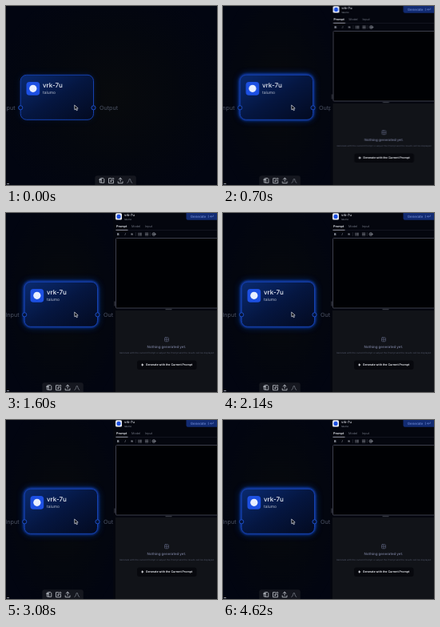
An HTML page that plays this animation: 264 by 224 pixels, repeating every 4.64 s.

```html
<!DOCTYPE html>
<html lang="en">
<head>
<meta charset="utf-8">
<title>Model node panel</title>
<style>
  html, body { margin: 0; width: 100%; height: 100%; overflow: hidden; background: #020510; }
  svg { display: block; width: 264px; height: 224px; font-family: Inter, sans-serif; text-rendering: geometricPrecision; }
  .slide { animation: slide 4640ms infinite; }
  .edge { --from: 131px; }
  .middle { --from: -41px; } /* relative to the panel edge */
  .end { --from: 49px; }
  .tools { --from: 66px; }
  @keyframes slide {
    0%, .86% { transform: translateX(var(--from)); animation-timing-function: cubic-bezier(.22, 1, .36, 1); }
    20%, 100% { transform: translateX(0); }
  }
  .pane { animation: squeeze 4640ms infinite; }
  @keyframes squeeze {
    0%, .86% { transform: scaleX(1); animation-timing-function: cubic-bezier(.22, 1, .36, 1); }
    20%, 100% { transform: scaleX(.53); }
  }
  .node { animation: recenter 4640ms infinite; }
  @keyframes recenter {
    0%, 8.6% { transform: translateX(0); animation-timing-function: ease-in-out; }
    20%, 100% { transform: translateX(5px); }
  }
  .glow { animation: glow 4640ms infinite; }
  @keyframes glow {
    0%, .86% { opacity: .15; animation-timing-function: ease-out; }
    7%, 100% { opacity: 1; }
  }
  .pulse { animation: pulse 2320ms ease-in-out infinite; }
  @keyframes pulse { 0%, 100% { opacity: 1; } 50% { opacity: .9; } }

  /* The hint takes two lines until the panel is wide enough. */
  .above, .below { animation: rewrap 4640ms step-end infinite; }
  .above { --gap: -2.6px; }
  .below { --gap: 1.9px; }
  @keyframes rewrap { 0% { transform: translateY(var(--gap)); } 14% { transform: none; } }
  .two { animation: narrow 4640ms step-end infinite; }
  .one { animation: narrow 4640ms step-end infinite reverse; animation: full 4640ms step-end infinite; }
  @keyframes narrow { 0% { opacity: 1; } 14%, 100% { opacity: 0; } }
  @keyframes full { 0% { opacity: 0; } 14%, 100% { opacity: 1; } }

  .icon { fill: none; stroke: #c6c9d1; stroke-width: .8; stroke-linecap: round; stroke-linejoin: round; }
  .fine { stroke: #a5a9b4; stroke-width: .55; }
  .mid { text-anchor: middle; }
</style>
</head>
<body>
<svg viewBox="0 0 264 224">
  <defs>
    <radialGradient id="sky">
      <stop offset="0" stop-color="#080a0d"/>
      <stop offset=".55" stop-color="#04070e"/>
      <stop offset="1" stop-color="#020511"/>
    </radialGradient>
    <linearGradient id="card" x1="0" y1="0" x2="1" y2="1">
      <stop offset="0" stop-color="#0a2a70"/>
      <stop offset=".5" stop-color="#051640"/>
      <stop offset="1" stop-color="#030a20"/>
    </linearGradient>
    <filter id="wide" x="-30%" y="-40%" width="160%" height="180%"><feGaussianBlur stdDeviation="5"/></filter>
    <filter id="near" x="-20%" y="-30%" width="140%" height="160%"><feGaussianBlur stdDeviation="1.7"/></filter>
    <clipPath id="panel"><rect x="134" width="190" height="224"/></clipPath>
  </defs>

  <rect width="264" height="224" fill="#020511"/>
  <g class="pane"><ellipse cx="134" cy="112" rx="150" ry="140" fill="url(#sky)"/></g>
  <path d="M1 222.5h3" stroke="#b9bcc4" stroke-width=".8"/>

  <g class="node">
    <g class="glow"><g class="pulse">
      <rect x="17" y="85" width="93.500" height="58" rx="9" fill="#0a3095" opacity=".75" filter="url(#wide)"/>
      <rect x="18" y="86" width="91.500" height="56" rx="8" fill="none" stroke="#1449cc" stroke-width="2.500" filter="url(#near)"/>
    </g></g>
    <rect x="18.200" y="86.300" width="91.300" height="56" rx="7.500" fill="url(#card)" stroke="#1541ae" stroke-width="1"/>
    <rect x="25.500" y="95" width="16.700" height="16.700" rx="3.800" fill="#1d50e2"/>
    <circle cx="33.850" cy="103.350" r="4.600" fill="#e9efff"/>
    <text x="46" y="101.800" font-size="8" font-weight="500" fill="#eef1f8">vrk-7u</text>
    <text x="46" y="109.800" font-size="5" fill="#b4bccd">talumo</text>
    <g fill="#061336" stroke="#1d4fc6" stroke-width="1">
      <circle cx="18.200" cy="127.300" r="2.600"/>
      <circle cx="109.500" cy="127.300" r="2.600"/>
    </g>
    <g font-size="7.200" fill="#4b5263">
      <text x="11.500" y="129.700" text-anchor="end">Input</text>
      <text x="117" y="129.700">Output</text>
    </g>
  </g>

  <g class="slide tools">
    <rect x="45.300" y="212.300" width="51.500" height="14" rx="3" fill="#15171f"/>
    <g class="icon" transform="translate(.3)">
      <path d="M52 216h-1v5h2M53 215.500h2.500l1 1.200v4.500h-3zM50.500 217.500h3"/>
      <path d="M65.500 215.700h-3.300v6h6v-3.200M64.500 219.500l.4-1.600 2.800-2.700 1.100 1.100-2.800 2.700z"/>
      <path d="M76.800 219.500v-4.300M74.900 217l1.900-1.900 1.900 1.900M73.900 219.700v2h5.800v-2"/>
      <path d="M85.500 221.500c2 0 1.800-5.500 3-5.500s1 5.500 3 5.500" stroke="#777b86"/>
    </g>
  </g>

  <g class="slide edge" clip-path="url(#panel)">
    <rect x="134" width="190" height="224" fill="#04060e"/>
    <rect x="137" y="122" width="190" height="102" fill="#111318"/>
    <path d="M136 110.500v6" stroke="#4a4d57" stroke-width=".9"/>
    <rect x="137.500" y="31.500" width="140" height="87.500" rx="1" fill="#000104" stroke="#434654" stroke-width=".9"/>
    <rect x="137" y=".3" width="8" height="8.300" rx="1.500" fill="#e9edf8"/>
    <circle cx="141" cy="4.450" r="2.600" fill="#1d50e2"/>
    <text x="148" y="4.300" font-size="4.200" font-weight="500" fill="#e3e6ee">vrk-7u</text>
    <text x="148" y="9.400" font-size="2.900" fill="#8b909d">talumo</text>
    <g font-size="3.800" fill="#6c717e">
      <text x="138" y="17.900" font-weight="600" fill="#f0f2f7">Prompt</text>
      <text x="157" y="17.900">Model</text>
      <text x="174" y="17.900">Input</text>
    </g>
    <path d="M137 21.500h140" stroke="#1b1e29" stroke-width=".6"/>
    <path d="M137.500 21.300h15" stroke="#c7cbd6" stroke-width=".7"/>
    <g font-size="4" fill="#b3b7c1">
      <text x="139" y="28" font-weight="700">B</text>
      <text x="148.500" y="28" font-style="italic">I</text>
      <text x="156.300" y="28" text-decoration="line-through">S</text>
    </g>
    <g class="icon fine">
      <path d="M162.300 24.500v4M180.300 24.500v4" stroke="#343843"/>
      <path d="M165.500 25.200h.1M165.500 26.600h.1M165.500 28h.1M166.800 25.200h2.700M166.800 26.600h2.700M166.800 28h2.700"/>
      <path d="M174.300 25h3.500M174.300 26.500h3.500M174.300 28h3.500"/>
      <circle cx="185" cy="26.500" r="2"/>
      <path d="M184 26.500h2M185 25.500v2"/>
    </g>

    <g class="slide middle">
      <path d="M199.500 120.700h8" stroke="#4a4d57" stroke-width=".9"/>
      <g class="above">
        <g class="icon fine" style="stroke:#666c8a">
          <rect x="198.500" y="155.800" width="5" height="5" rx=".8"/>
          <path d="M198.500 158.300h5M201 155.800v5"/>
        </g>
        <text class="mid" x="201" y="168.500" font-size="4.400" font-weight="600" fill="#6f7590">Nothing generated yet.</text>
      </g>
      <g class="mid" font-size="2.900" fill="#515668">
        <text class="one" x="201" y="175.500">Generate with the current Prompt or adjust the Prompt and the results will be displayed</text>
        <text class="two" x="201" y="172.800">Generate with the current Prompt or adjust the Prompt and the results will be<tspan x="201" dy="5.200">displayed.</tspan></text>
      </g>
      <g class="below" fill="#eef0f5">
        <rect x="164" y="184.500" width="74.500" height="11.500" rx="3" fill="#07080d"/>
        <path d="M170.700 187.900l.6 1.500 1.500.6-1.500.6-.6 1.500-.6-1.500-1.500-.6 1.500-.6z"/>
        <text x="174.700" y="191.400" font-size="3.600" font-weight="600">Generate with the Current Prompt</text>
      </g>
    </g>
  </g>

  <g class="slide end">
    <rect x="225.500" y="-3" width="42" height="11.700" rx="2" fill="#122b72"/>
    <text x="230.800" y="5.700" font-size="4.400" font-weight="500" fill="#6f89d2">Generate</text>
    <path class="icon fine" d="M253.300 3v2.700M259.300 2.800v1.600h-3.600M256.800 3.300l-1.100 1.100 1.100 1.100" style="stroke:#6f89d2"/>
  </g>

  <path d="M85.700 124l.2 5.900 1.400-1.300 1 2.200 1.100-.5-1-2.100 1.800-.2z" fill="#05070d" stroke="#e6e8ee" stroke-width=".7" stroke-linejoin="round"/>
</svg>
</body>
</html>
```
